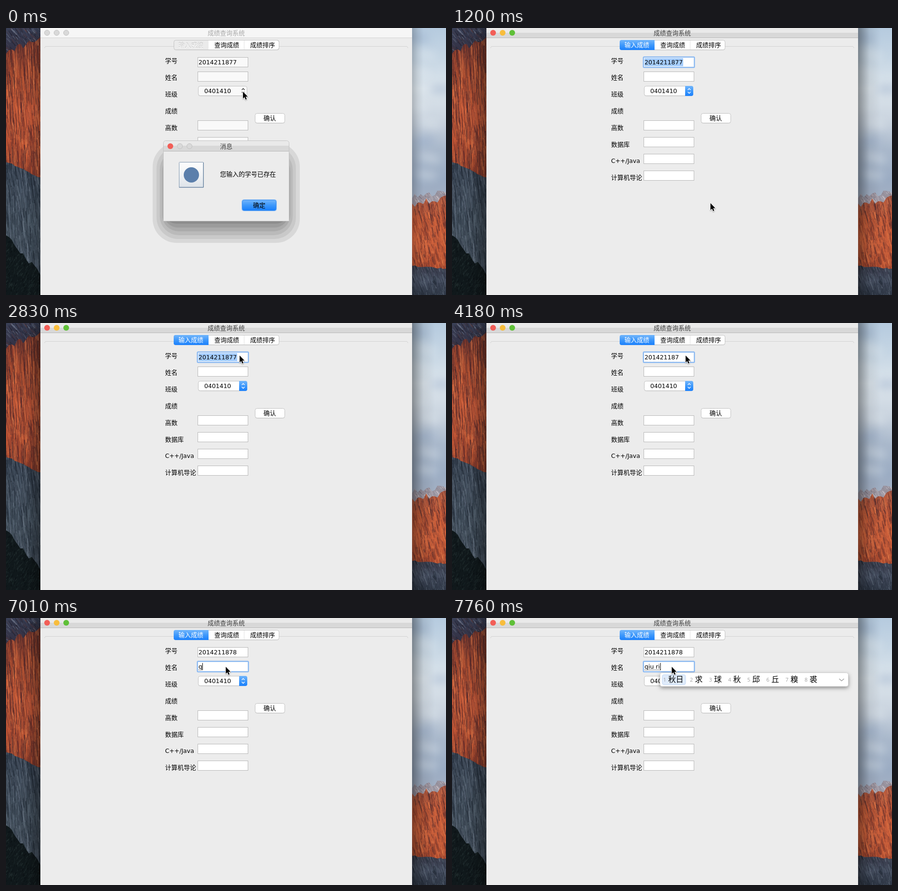
Animation, 921 px wide and 558 px high, one loop 8 s. Source, as an HTML page with a canvas:

```html
<!DOCTYPE html>
<html lang="zh-CN">
<head>
<meta charset="utf-8">
<title>成绩查询系统</title>
<style>
html, body { margin: 0; width: 921px; height: 558px; overflow: hidden; background: #ececec; }
canvas { display: block; }
</style>
</head>
<body>
<canvas id="stage" width="921" height="558"></canvas>
<script>
const LOOP = 8000;
const CJK = '"Noto Sans CJK SC", "Noto Sans CJK JP", sans-serif';
const LATIN = '12.6px "DejaVu Sans", sans-serif';
const screen = document.getElementById('stage').getContext('2d');
let ctx = screen;

// ---- helpers ----
function text(s, x, y, color = '#000', font = '13px ' + CJK) {
  ctx.font = font;
  ctx.fillStyle = color;
  ctx.fillText(s, x, y);
}
const latin = (s, x, y) => text(s, x, y, '#000', LATIN);

function box(x, y, w, h, fill) {
  ctx.fillStyle = fill;
  ctx.fillRect(x, y, w, h);
}

function round(x, y, w, h, r, fill, line) {
  ctx.beginPath();
  ctx.roundRect(x, y, w, h, r);
  if (fill) { ctx.fillStyle = fill; ctx.fill(); }
  if (line) { ctx.strokeStyle = line; ctx.lineWidth = 1; ctx.stroke(); }
}

function circle(x, y, r, fill, line) {
  ctx.beginPath();
  ctx.arc(x, y, r, 0, 7);
  ctx.fillStyle = fill;
  ctx.fill();
  if (line) { ctx.strokeStyle = line; ctx.lineWidth = 1; ctx.stroke(); }
}

function trace(pts) {
  ctx.beginPath();
  pts.forEach(([x, y]) => ctx.lineTo(x, y));
}

function poly(pts, fill) {
  trace(pts);
  ctx.fillStyle = fill;
  ctx.fill();
}

function stroke(pts, color, width = 1) {
  trace(pts);
  ctx.strokeStyle = color;
  ctx.lineWidth = width;
  ctx.stroke();
}

function grad(x0, y0, x1, y1, ...colors) {
  const g = ctx.createLinearGradient(x0, y0, x1, y1);
  colors.forEach((c, i) => g.addColorStop(i / (colors.length - 1), c));
  return g;
}
const blue = (y, h) => grad(0, y, 0, y + h, '#73b6fb', '#3f99fb', '#1a80fc');

// last entry whose time has come
const at = (keys, t) => keys.filter(k => k[0] <= t).pop();

// ---- wallpaper ----
let seed = 11;
const rnd = () => (seed = seed * 16807 % 2147483647) / 2147483647;
const spread = n => (rnd() - 0.5) * n;

// rock face hanging from a rough slope, grained by thin streaks
function rock(x, w, y0, y1, bottom, rough, fill, grain, len, slant) {
  const face = [];
  for (let k = 0; k <= 12; k++) face.push([x + w * k / 12, y0 + (y1 - y0) * k / 12 + spread(rough)]);
  face.push([x + w, bottom], [x, bottom]);
  const top = Math.min(y0, y1), area = w * (bottom - top);
  ctx.save();
  poly(face, fill);
  ctx.clip();
  for (let i = 0; i < area / 16; i++) {
    let px = x + rnd() * w, py = top - len + rnd() * (bottom - top + len);
    const line = [[px, py]], step = len * (0.2 + rnd()) / 3;
    for (let k = 0; k < 3; k++) line.push([px += slant * step + spread(2), py += step]);
    ctx.globalAlpha = 0.2 + rnd() * 0.4;
    stroke(line, grain[i % grain.length], 0.6 + rnd() * 1.4);
  }
  ctx.restore();
}

function paintWallpaper() {
  const snow = ['#7e8799', '#1f1d28', '#593a3c', '#2b2c3c'];
  const orange = ['#4a242a', '#e8824f', '#6f2f28', '#d9683c', '#a3452c', '#33202a'];
  const slate = ['#1d2530', '#6c7887', '#2a3440', '#4d5b6b'];
  // left cliff
  rock(0, 72, 0, 0, 90, 0, grad(0, 0, 0, 70, '#3a4158', '#30293a'), snow, 10, 0.8);
  rock(0, 72, 50, 22, 314, 14, grad(0, 20, 0, 312, '#5c2e2e', '#a54c30', '#c4593a', '#bd5435', '#91402c'), orange, 45, 0.06);
  rock(0, 72, 279, 313, 558, 3, grad(0, 280, 0, 540, '#303a49', '#46535f', '#39434e'), slate, 36, 0.1);
  rock(0, 72, 428, 518, 558, 14, '#10181b', ['#1f2c2d', '#080d10', '#2c3a3a'], 7, -0.5);

  // right sky and ridge
  box(850, 0, 71, 380, grad(0, 0, 0, 380, '#b6cbdf', '#c6d6e4', '#dce5ec', '#cbd5e0', '#a9b8cb', '#9bacc3', '#a8b2c3'));
  ctx.save();
  ctx.filter = 'blur(9px)';
  for (let i = 0; i < 9; i++) {
    ctx.beginPath();
    ctx.ellipse(860 + rnd() * 60, 20 + i * 36, 24, 10, spread(0.6), 0, 7);
    ctx.fillStyle = i % 3 ? 'rgba(228,235,241,.4)' : 'rgba(140,163,194,.4)';
    ctx.fill();
  }
  ctx.restore();
  rock(850, 71, 352, 344, 400, 12, '#98939f', ['#dcd5d9', '#6f6570', '#b9a8ac'], 9, 0.8);
  rock(850, 71, 372, 354, 504, 16, grad(0, 350, 0, 502, '#a55a46', '#c45c3a', '#ce613c', '#a9492e'), orange, 22, 0.2);
  rock(850, 71, 497, 503, 558, 3, grad(0, 500, 0, 558, '#3a3c4c', '#444c5e', '#2d3543'), slate, 16, 0.3);
}

const wallpaper = document.createElement('canvas');
wallpaper.width = 921;
wallpaper.height = 558;
ctx = wallpaper.getContext('2d');
paintWallpaper();
ctx = screen;

// ---- window ----
const LIGHTS = ['#f25e57', '#f8bd3c', '#5fc038'];
function light(x, y, color) {
  if (color) circle(x, y, 6, color);
  else circle(x, y, 5.5, '#d9d9d9', '#c2c2c2');
}

function titleBar(x, y, w, h, active) {
  const split = Math.floor(h / 2);
  box(x, y, w, h, active ? '#e9e9e9' : '#f6f6f6');
  if (active) box(x, y + split, w, h - split, '#d8d8d8');
  box(x, y + h, w, 1, active ? '#b9b9b9' : '#d3d3d3');
}

function field(y, focused, fill) {
  if (focused) round(399.5, y - 1.5, 109, 24, 2.5, '#84b5f2');
  box(401, y, 106, 21, focused ? '#9fc4f0' : '#b8b8b8');
  box(402, y + 1, 104, 19, fill);
}

function button(x, y, w, fill) {
  round(x + 0.5, y + 1.5, w, 20, 4, 'rgba(0,0,0,.1)');
  round(x + 0.5, y + 0.5, w, 20, 4, fill, '#c2c2c2');
}

function chevrons(x, y, color) {
  for (const d of [-1, 1]) stroke([[x - 3, y + d * 2], [x, y + d * 5], [x + 3, y + d * 2]], color, 1.4);
}

function drawWindow(active, paper) {
  const reach = active ? 48 : 24, dark = `rgba(0,0,0,${active ? 0.38 : 0.2})`;
  for (const [edge, dir] of [[72, -1], [850, 1]]) {
    const far = edge + dir * reach;
    box(Math.min(edge, far), 0, reach, 558, grad(far, 0, edge, 0, 'rgba(0,0,0,0)', 'rgba(0,0,0,.08)', dark));
  }

  ctx.save();
  ctx.beginPath();
  ctx.roundRect(72, -1, 778, 580, 4);
  ctx.clip();
  box(72, 0, 778, 558, '#ececec');
  titleBar(72, 0, 778, 20, active);
  ctx.restore();
  LIGHTS.forEach((c, i) => light(86 + i * 20, 10, active && c));
  text('成绩查询系统', 422, 15, active ? '#3e3e3e' : '#a9a9a9');

  // tabs
  stroke([[80.5, 42], [82.5, 38.5], [839.5, 38.5], [841.5, 42]], '#d2d2d2');
  round(351.5, 26.5, 220, 20, 4, 'rgba(0,0,0,.1)');
  round(351.5, 25.5, 220, 20, 4, '#fff', '#c3c3c3');
  round(351, 25, 73, 21, [4, 0, 0, 4], active ? blue(25, 21) : '#ebebeb');
  if (!active) {
    round(351.5, 25.5, 220, 20, 4, null, '#c3c3c3');
    text('输入成绩', 361, 40, '#b0b0b0');
  }
  text('输入成绩', 361, active ? 40 : 41, '#fff');
  box(498, 26, 1, 19, '#e2e2e2');
  text('查询成绩', 436, 40);
  text('成绩排序', 511, 40);

  // form
  ['学号', '姓名', '班级', '成绩', '高数', '数据库'].forEach((s, i) => text(s, 333, 73 + i * 35));
  latin('C++/Java', 333, 282);
  text('计算机导论', 333, 317);
  for (let y = 193; y < 300; y += 35) field(y, false, paper);
  button(402, 121, 102, paper);
  if (active) round(488, 121, 17, 21, [0, 4, 4, 0], blue(121, 21));
  chevrons(496.5, 131.5, active ? '#fff' : '#333');
  latin('0401410', 415, 136);
  button(521, 178, 62, '#fff');
  text('确认', 539, 193);
}

// ---- message box ----
function drawDialog() {
  for (let i = 0; i < 6; i++) {
    const side = 9 * i - 0.8 * i * i, gray = 216 - 15 * i;
    round(307 + side, 240 + 8 * i, 308 - side * 2, 209 - 16 * i, 50 - 5 * i, `rgb(${gray},${gray},${gray})`);
  }
  round(329.5, 235.5, 263, 168, [5, 5, 0, 0], '#ececec', '#c4c4c4');
  ctx.save();
  ctx.beginPath();
  ctx.roundRect(330, 236, 262, 167, [5, 5, 0, 0]);
  ctx.clip();
  titleBar(330, 236, 262, 21, true);
  ctx.restore();
  for (let i = 0; i < 3; i++) light(344 + i * 20, 247, !i && LIGHTS[0]);
  text('消息', 448, 252, '#3e3e3e');

  round(362.5, 280.5, 50.5, 52.5, 1, grad(0, 280, 0, 333, '#fdfdfd', '#f1f3f5', '#dde3e9'), '#8299b0');
  stroke([[362, 333], [413.5, 333], [413.5, 281]], '#627f9d');
  circle(388, 307, 16, '#5b7fab');
  text('您输入的学号已存在', 448, 310);

  round(493, 358, 74, 25, 5, '#a8cdf6');
  round(494.5, 359.5, 71, 22, 4, blue(359, 22), '#3b8ded');
  text('确定', 517, 375);
}

// ---- input method ----
function drawCandidates(x, list) {
  const [head, tail] = list.split(',');
  ctx.save();
  ctx.shadowColor = 'rgba(0,0,0,.45)';
  ctx.shadowBlur = 8;
  ctx.shadowOffsetY = 3;
  round(x, 115, 394, 28, 4, '#fff');
  ctx.restore();
  round(x, 114.5, 394, 28.5, 4, '#fff', '#d2d2d2');
  round(x + 4.5, 118.5, 17 + head.length * 16, 21, 4, '#dfebfb', '#c3d8f3');
  let cx = x + 17;
  [head, ...tail].forEach((s, i) => {
    text(i + 1, cx - 10.5, 133, '#a0a0a0', '11px "Open Sans", sans-serif');
    text(s, cx, 134, '#000', '16px ' + CJK);
    cx += s.length * 16 + 24;
  });
  stroke([[x + 375, 127], [x + 380, 131.5], [x + 385, 127]], '#999', 1.3);
}

// ---- mouse: start time, steps, then start, bend and end of a curve ----
const STEP = 149;
const MOVES = [
  [150, 6, [496, 133], [560, 517], [541, 366]],
  [1350, 10, [541, 366], [480, 42], [489, 68]],
  [4930, 3, [489, 68], [460, 122], [460, 102]]
];
const ARROW = [[0, 0], [0, 14.5], [3.3, 11.5], [5.6, 16.8], [7.9, 15.8], [5.7, 10.6], [10.2, 10.4], [0, 0]];

function mouseAt(t) {
  const [start, steps, a, b, c] = at(MOVES, t) || MOVES[0];
  const done = Math.floor((t - start) / STEP) + 1;
  const u = Math.max(0, Math.min(1, done / steps)), v = 1 - u;
  return a.map((p, i) => Math.round(v * v * p + 2 * u * v * b[i] + u * u * c[i]));
}

function drawMouse(t) {
  ctx.save();
  ctx.translate(...mouseAt(t));
  ctx.lineJoin = 'round';
  ctx.shadowColor = 'rgba(0,0,0,.35)';
  ctx.shadowBlur = 2;
  ctx.shadowOffsetY = 1;
  stroke(ARROW, '#fff', 2.2);
  ctx.shadowColor = 'transparent';
  poly(ARROW, '#000');
  ctx.restore();
}

// ---- scene ----
const CLOSE = 1200, DESELECT = 2980, ERASE = 3580, RETYPE = 4480, NEXT = 5520;
const TYPED = [[NEXT, ''], [7010, 'q'], [7160, 'q', '去,求前权其却邱庆泉'], [7310, 'qiu', '求,球秋邱丘糗裘囚酋'],
  [7610, 'qiu r', '求人,求球秋邱丘糗裘'], [7760, 'qiu ri', '秋日,求球秋邱丘糗裘']];
const EDITS = [[DESELECT], [ERASE], [RETYPE], ...TYPED];

// the caret blinks anew after each edit
const caretOn = t => t >= DESELECT && (t - at(EDITS, t)[0]) % 1050 < 600;

function draw(t) {
  const active = t >= CLOSE, naming = t >= NEXT, paper = active ? '#fff' : '#f9f9f9';
  const number = '201421187' + (t < ERASE ? '7' : t < RETYPE ? '' : '8');
  const [, typed, list] = at(TYPED, t) || [0, ''];

  ctx.drawImage(wallpaper, 0, 0);
  drawWindow(active, paper);
  field(61, active && !naming, paper);
  if (active && t < DESELECT) box(403, 63, 81, 17, '#a5cdfd');
  latin(number, 403, 76);
  field(91, naming, paper);
  latin(typed, 403, 106);

  ctx.font = LATIN;
  const end = 403 + Math.round(ctx.measureText(naming ? typed : number).width + (typed ? 0.4 : 0));
  if (typed) for (let x = 403; x < end; x += 2) box(x, 108, 1, 1, '#000');
  if (caretOn(t)) box(end, naming ? 94 : 64, 1, 15, '#000');

  if (list) drawCandidates(end - 0.5, list);
  if (!active) drawDialog();
  drawMouse(t);
}

function tick(now) {
  draw(now % LOOP);
  requestAnimationFrame(tick);
}
requestAnimationFrame(tick);
</script>
</body>
</html>
```
